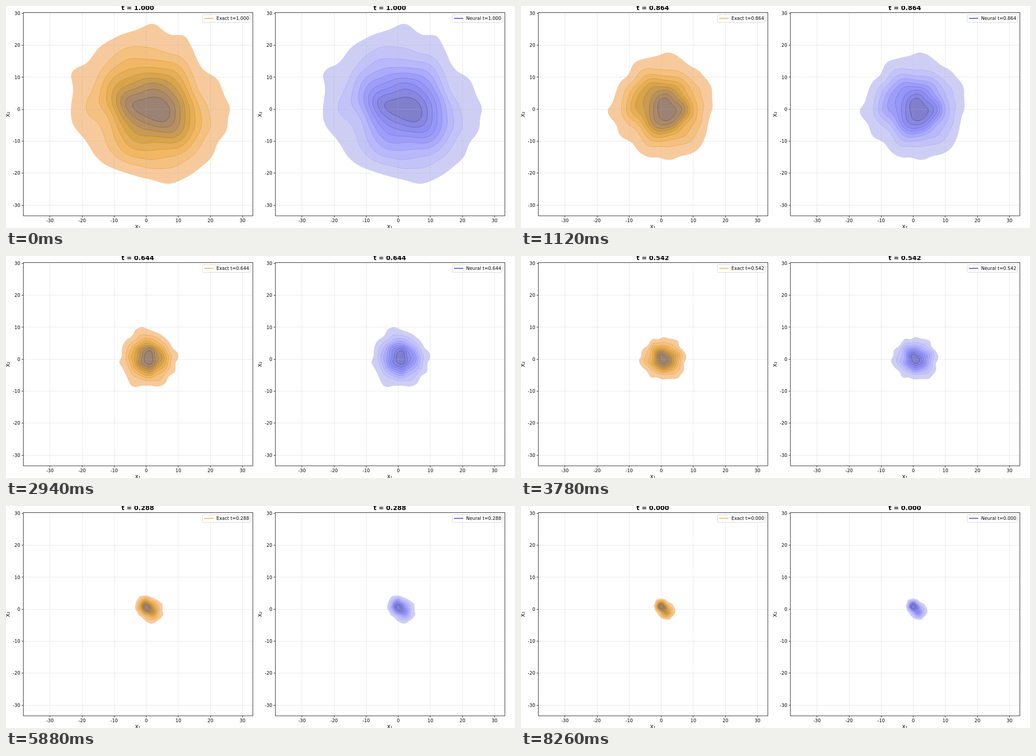
Write an HTML page that moves like this. It is 1131 px wide and 495 px high and loops after 8.4 s.

```html
<!DOCTYPE html>
<html lang="en">
<head>
<meta charset="utf-8">
<title>Density contours</title>
<style>
html, body { margin: 0; width: 100%; height: 100%; overflow: hidden; background: #fff; }
svg { display: block; width: 100vw; height: 100vh; }
text { font: 10.1px "DejaVu Sans", sans-serif; fill: #000; }
.title { font-size: 14px; font-weight: bold; text-anchor: middle; }
.axis { font-size: 11px; text-anchor: middle; }
.mid { text-anchor: middle; }
.end { text-anchor: end; }
</style>
</head>
<body>
<svg id="stage" viewBox="0 0 1131 495"></svg>
<script>
const STEP = 140, STEPS = 60, LEVELS = 9, SAMPLES = 1000, GRID = 96;
const X0 = 311.6, Y0 = 230.1, UNIT = 7.13;
const BOX = { left: 38.5, top: 14.5, right: 548.5, bottom: 467.9 };

// Two clusters that the noise spreads out; their joint deviation is REST
const clusters = [{ x: 311, y: 223, sd: 5.4 }, { x: 323, y: 235, sd: 7.4 }];
const CX = 317, CY = 229, REST = 9.6;

const panels = [
  { x: 0, name: 'Exact', key: { x: 436.5, w: 106 }, ink: '#f0a02c',
    fill: ['#f7ca9d', '#f1b765', '#d8a44a', '#b6905f', '#9c8272'],
    line: ['#eda63c', '#c58820', '#6c5848'] },
  { x: 560, name: 'Neural', key: { x: 431.5, w: 111 }, ink: '#1c1ccf',
    fill: ['#cecef5', '#b8b8fb', '#9d9dfa', '#8e8ef0', '#7f7fcc'],
    line: ['#adadf8', '#7c7cf2', '#4848b4'] }
];

const lerp = (a, b, u) => a + (b - a) * u;
const timeAt = k => 1 - k / (STEPS - 1);

function ramp(colors, u) {
  const p = u * (colors.length - 1), i = Math.min(Math.floor(p), colors.length - 2);
  const part = (c, j) => parseInt(c.slice(1 + 2 * j, 3 + 2 * j), 16);
  return 'rgb(' + [0, 1, 2].map(j => Math.round(lerp(part(colors[i], j), part(colors[i + 1], j), p - i))) + ')';
}

function random(seed) {
  return () => {
    seed = (seed + 0x6d2b79f5) | 0;
    let v = Math.imul(seed ^ (seed >>> 15), 1 | seed);
    v = (v + Math.imul(v ^ (v >>> 7), 61 | v)) ^ v;
    return ((v ^ (v >>> 14)) >>> 0) / 4294967296;
  };
}

// Kernel density of the noisy samples on a square grid around the centre
function density(k) {
  const noise = 67 * Math.exp(2.97 * (timeAt(k) - 1));
  const total = Math.hypot(noise, REST), width = total * SAMPLES ** (-1 / 6);
  const half = 3.7 * total, cell = 2 * half / (GRID - 1);
  const rnd = random(k * 7919 + 17);
  const normal = () => Math.sqrt(-2 * Math.log(1 - rnd())) * Math.cos(2 * Math.PI * rnd());
  const values = new Float64Array(GRID * GRID);
  const gx = new Float64Array(GRID), gy = new Float64Array(GRID);
  const left = CX - half, top = CY - half;

  for (let s = 0; s < SAMPLES; s++) {
    const c = clusters[s % 2], sd = Math.hypot(c.sd, noise);
    const x = c.x + sd * normal(), y = c.y + sd * normal();
    for (let i = 0; i < GRID; i++) {
      gx[i] = Math.exp(-0.5 * ((left + i * cell - x) / width) ** 2);
      gy[i] = Math.exp(-0.5 * ((top + i * cell - y) / width) ** 2);
    }
    for (let j = 0; j < GRID; j++) {
      if (gy[j] < 1e-5) continue;
      for (let i = 0; i < GRID; i++) values[j * GRID + i] += gx[i] * gy[j];
    }
  }
  return { values, left, top, cell };
}

// Densities below which equal steps of the total mass lie
function thresholds(values) {
  const sorted = values.slice().sort();
  const mass = sorted.reduce((a, b) => a + b, 0);
  const result = [];
  let sum = 0;
  for (const v of sorted) {
    sum += v;
    while (result.length < LEVELS && sum >= mass * (0.05 + 0.95 * result.length / LEVELS)) result.push(v);
  }
  return result;
}

// Marching squares: each cell links the edge where it is entered to the one where it is left
function contour({ values, left, top, cell }, level) {
  const links = new Map();
  const cross = (a, b) => {
    const lo = Math.min(a, b), hi = Math.max(a, b);
    const u = (level - values[lo]) / (values[hi] - values[lo]);
    const at = n => [left + n % GRID * cell, top + Math.floor(n / GRID) * cell];
    const [ax, ay] = at(lo), [bx, by] = at(hi);
    return { id: lo * 2 + (hi - lo === 1 ? 0 : 1), x: lerp(ax, bx, u), y: lerp(ay, by, u) };
  };
  for (let j = 0; j < GRID - 1; j++) for (let i = 0; i < GRID - 1; i++) {
    const n = j * GRID + i, ring = [n, n + 1, n + GRID + 1, n + GRID];
    const up = ring.map(c => values[c] >= level);
    for (let e = 0; e < 4; e++) {
      if (up[e] || !up[(e + 1) % 4]) continue;
      let x = (e + 1) % 4;
      while (up[(x + 1) % 4]) x = (x + 1) % 4;
      links.set(cross(ring[e], ring[(e + 1) % 4]).id, cross(ring[x], ring[(x + 1) % 4]));
    }
  }
  let d = '';
  while (links.size) {
    let id = links.keys().next().value, pen = 'M';
    while (links.has(id)) {
      const p = links.get(id);
      links.delete(id);
      d += pen + p.x.toFixed(2) + ' ' + p.y.toFixed(2);
      pen = 'L';
      id = p.id;
    }
    d += 'Z';
  }
  return d;
}

function add(parent, tag, attrs, text) {
  const el = document.createElementNS('http://www.w3.org/2000/svg', tag);
  for (const name in attrs) el.setAttribute(name, attrs[name]);
  if (text !== undefined) el.textContent = text;
  return parent.appendChild(el);
}

function build(p) {
  const g = add(document.getElementById('stage'), 'g', { transform: `translate(${p.x} 0)` });
  const { left, top, right, bottom } = BOX;
  p.areas = [];
  p.lines = [];
  for (let i = 0; i < LEVELS; i++) p.areas.push(add(g, 'path', { fill: ramp(p.fill, i / (LEVELS - 1)) }));
  const grid = add(g, 'path', { stroke: '#b0b0b0', 'stroke-opacity': 0.3, fill: 'none' });
  for (let i = 1; i < LEVELS; i++) {
    p.lines.push(add(g, 'path', { stroke: ramp(p.line, (i - 1) / (LEVELS - 2)), 'stroke-width': 0.8, fill: 'none' }));
  }

  let mesh = '', ticks = '';
  for (let v = -30; v <= 30; v += 10) {
    const x = Math.floor(X0 + v * UNIT) + 0.5, y = Math.floor(Y0 - v * UNIT) + 0.5;
    mesh += `M${x} ${top}V${bottom}M${left} ${y}H${right}`;
    ticks += `M${x} ${bottom}v3.6M${left} ${y}h-3.6`;
    add(g, 'text', { class: 'mid', x: X0 + v * UNIT, y: 482 }, v);
    add(g, 'text', { class: 'end', x: 31.6, y: Y0 - v * UNIT + 3.7 }, v);
  }
  grid.setAttribute('d', mesh);
  add(g, 'path', { d: `${ticks}M${left} ${top}H${right}V${bottom}H${left}Z`, stroke: '#000', 'stroke-width': 0.9, fill: 'none' });

  p.title = add(g, 'text', { class: 'title', x: 292.7, y: 9 });
  add(g, 'text', { class: 'axis', x: 292.7, y: 496 }, 'X₁');
  add(g, 'text', { class: 'axis', transform: 'translate(7.5 241.5) rotate(-90)' }, 'X₂');

  const { x, w } = p.key;
  add(g, 'rect', { x, y: 19.5, width: w, height: 17, rx: 2, fill: '#fff', 'fill-opacity': 0.8, stroke: '#d6d6d6' });
  add(g, 'path', { d: `M${x + 4} 27.5h20.5`, stroke: p.ink, 'stroke-width': 1.5 });
  p.label = add(g, 'text', { x: x + 31, y: 31 });
}

const frames = [];
function pathsAt(k) {
  if (!frames[k]) {
    const field = density(k);
    frames[k] = thresholds(field.values).map(level => contour(field, level));
  }
  return frames[k];
}

function draw(k) {
  const paths = pathsAt(k), t = timeAt(k).toFixed(3);
  for (const p of panels) {
    p.areas.forEach((el, i) => el.setAttribute('d', paths[i]));
    p.lines.forEach((el, i) => el.setAttribute('d', paths[i + 1]));
    p.title.textContent = 't = ' + t;
    p.label.textContent = p.name + ' t=' + t;
  }
}

let shown = -1;
function tick() {
  const k = Math.floor(performance.now() / STEP) % STEPS;
  if (k !== shown) draw(shown = k);
  requestAnimationFrame(tick);
}

panels.forEach(build);
tick();
</script>
</body>
</html>
```
